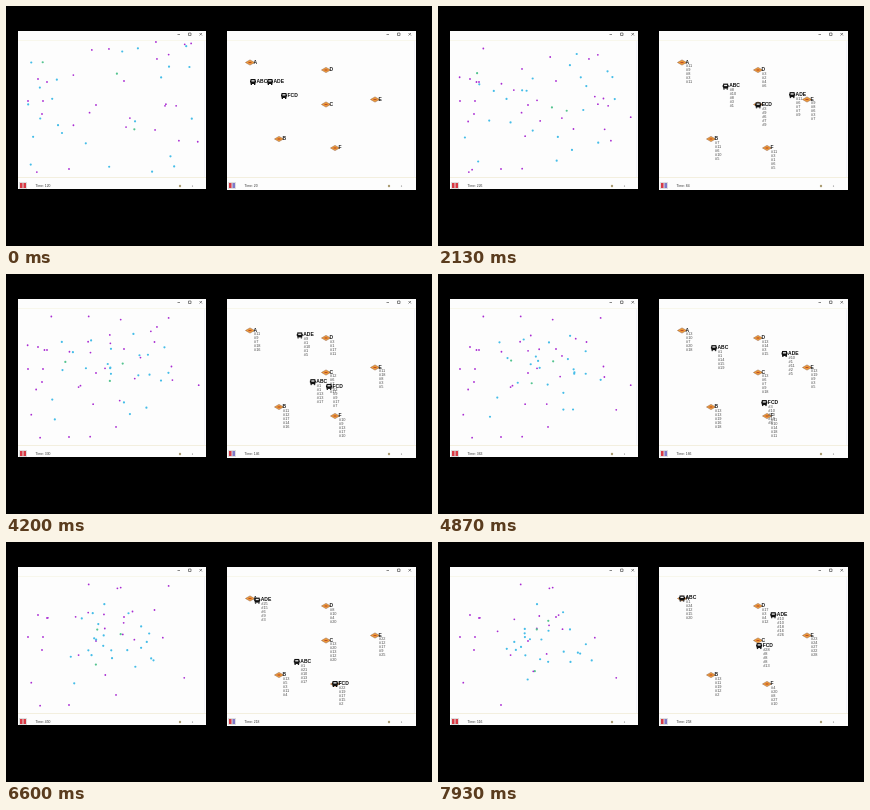
An HTML page with a canvas that plays this animation: 426x240 px, repeating every 8 s.

```html
<!DOCTYPE html>
<html lang="en">
<head>
<meta charset="utf-8">
<title>Bus simulation</title>
<style>
  html, body { margin: 0; width: 100%; height: 100%; overflow: hidden; background: #000; }
  canvas { display: block; width: 426px; height: 240px; }
</style>
</head>
<body>
<canvas id="stage" width="426" height="240"></canvas>
<script>
const ctx = document.getElementById('stage').getContext('2d');
const LOOP = 8, FPS = 15;
const PURPLE = '#a92bd2', CYAN = '#45bde8', GREEN = '#55c490';

const stops = {
  A: [244, 56.5], B: [273, 133], C: [320, 98.5],
  D: [320, 64], E: [369, 93.5], F: [329, 142]
};

// Speed in pixels per second; wait is the pause in seconds at the first stop of the route.
const buses = [
  { name: 'ABC', route: 'ABC', start: [247, 76], speed: 100, wait: .33 },
  { name: 'ADE', route: 'ADE', start: [264, 76], speed: 86, wait: .15 },
  { name: 'FCD', route: 'FCDC', start: [278, 90], speed: 92, wait: .2 }
];

function hash(a, b = 0) {
  const v = Math.sin(a * 127.1 + b * 311.7) * 43758.5453;
  return v - Math.floor(v);
}

const mix = (a, b, k) => a + (b - a) * k;
const distance = (p, q) => Math.hypot(p[0] - q[0], p[1] - q[1]);

function positionOn(path, t) {
  const next = path.findIndex(([time]) => time > t);
  const [t0, p] = path[next - 1], [t1, q] = path[next];
  const k = (t - t0) / (t1 - t0);
  return [mix(p[0], q[0], k), mix(p[1], q[1], k)];
}

function busPath({ route, start, speed, wait }) {
  const path = [[0, start]];
  let time = 0, spot = start;
  for (let visit = 0; time <= LOOP; visit++) {
    const stop = stops[route[visit % route.length]];
    time += distance(spot, stop) / speed;
    path.push([time, stop]);
    if (visit % route.length === 0) {
      time += visit ? wait : wait / 2;
      path.push([time, stop]);
    }
    spot = stop;
  }
  return path;
}
for (const bus of buses) bus.path = busPath(bus);

const seededSpot = (id, salt) => [
  mix(15, 195, hash(id, salt)),
  mix(36, 167, hash(id, salt + .5))
];

function walkPath(id) {
  let time = 0, spot = seededSpot(id, 1);
  const path = [[0, spot]];
  for (let leg = 2; time <= LOOP; leg++) {
    const goal = seededSpot(id, leg);
    time += 1 + 1.5 * hash(id, leg + .2);
    spot = [mix(spot[0], goal[0], .3), mix(spot[1], goal[1], .3)];
    path.push([time, spot]);
  }
  return path;
}

const walkers = Array.from({ length: 34 }, (_, i) => ({
  path: walkPath(i + 1),
  color: i % 11 === 2 ? GREEN : i % 4 === 1 ? PURPLE : CYAN
}));

// A few people rest for the whole loop, the others for a while.
const resting = [[22, 95], [90, 99], [63, 163], [36, 108], [37, 95], [32, 73], [41, 76], [118, 75]]
  .map((spot) => ({ spot, from: 0, to: LOOP }));
for (let id = 100; id < 136; id++) {
  const from = mix(-3, 6, hash(id, 7));
  resting.push({ spot: seededSpot(id, 1), from, to: from + 3 + 3 * hash(id, 8) });
}

function rect(color, x, y, w, h) {
  ctx.fillStyle = color;
  ctx.fillRect(x, y, w, h);
}

function text(string, x, y, size, color = '#222', weight = '') {
  ctx.font = `${weight} ${size}px "Liberation Sans", sans-serif`;
  ctx.fillStyle = color;
  ctx.fillText(string, x, y);
}

function dot(x, y, radius, color) {
  ctx.fillStyle = color;
  ctx.beginPath();
  ctx.arc(x, y, radius, 0, 7);
  ctx.fill();
}

function drawWindow(x, width, height, time, secondBar) {
  rect('#fdfdfd', x, 25, width, height);
  rect('#f8f7ec', x, 34, width, 1);
  rect('#f3efdf', x, 171, width, 1);
  rect('#f2f3fa', x + width - 2, 35, 1, 136);

  ctx.strokeStyle = '#555';
  ctx.lineWidth = .7;
  ctx.beginPath();
  ctx.moveTo(x + 159.5, 28.5); ctx.lineTo(x + 162, 28.5);
  ctx.rect(x + 170.5, 27, 2.5, 2.5);
  ctx.moveTo(x + 181.5, 27); ctx.lineTo(x + 184, 29.5);
  ctx.moveTo(x + 184, 27); ctx.lineTo(x + 181.5, 29.5);
  ctx.stroke();

  rect('#dedede', x + 1, 176, 8, 7);
  rect('#d93a45', x + 2, 177, 2.5, 5);
  rect(secondBar, x + 5.5, 177, 2.5, 5);
  text('Time: ' + time, x + 17.5, 181.3, 3.4, '#333');
  dot(x + 162, 180, 1.2, '#ab9c72');
  dot(x + 174.5, 180, .6, '#777');
}

function drawQueue(x, y, id, rows, t) {
  const batch = Math.floor((t + hash(id) * 1.4) / 1.5);
  for (let row = 0; row < rows; row++) {
    const number = 1 + Math.floor(hash(id * 9 + row, batch) * (5 + 3 * t));
    text('#' + number, x + 4, y + 4.6 + row * 4, 3.9, '#4a4a4a');
  }
}

function drawStop(name, id, t, boarding) {
  const [x, y] = stops[name];
  ctx.beginPath();
  ctx.moveTo(x - 4.5, y); ctx.lineTo(x, y - 2.6);
  ctx.lineTo(x + 4.5, y); ctx.lineTo(x, y + 2.6);
  ctx.closePath();
  ctx.fillStyle = '#f3a03a';
  ctx.fill();
  ctx.strokeStyle = '#8a5232';
  ctx.lineWidth = .5;
  ctx.stroke();
  rect('#b94e2a', x - 1.5, y - .6, 3, 1.2);
  text(name, x + 3.5, y + 1, 5, '#222', 'bold');
  if (t > .3 && !boarding) drawQueue(x, y, id, name === 'D' ? 4 : 5, t);
}

function drawBus(name, [x, y], id, t) {
  rect('#111', x - 2.5, y - 3, 5, 5);
  rect('#111', x - 3, y - 1.5, 6, 2);
  rect('#eee', x - 1.5, y - 1.8, 3, 1.3);
  rect('#111', x - 2.3, y + 2, 1.3, 1);
  rect('#111', x + 1, y + 2, 1.3, 1);
  text(name, x + 3.5, y + .8, 5, '#111', 'bold');
  if (t > 1.25) drawQueue(x, y, id, 5, t);
}

function draw(t) {
  rect('#000', 0, 0, 426, 240);

  drawWindow(12, 188, 158, Math.floor(120 + t * 50), '#d93a45');
  for (const { spot, from, to } of resting) {
    if (t >= from && t <= to) dot(...spot, .9, PURPLE);
  }
  for (const { path, color } of walkers) {
    dot(...positionOn(path, t), color === PURPLE ? .9 : 1.1, color);
  }

  drawWindow(221, 189, 159, Math.floor(20 + t * 30), '#7f79c9');
  const spots = buses.map(({ path }) => positionOn(path, t));
  Object.keys(stops).forEach((name, i) => {
    const boarding = spots.some((spot) => distance(spot, stops[name]) < 8);
    drawStop(name, i + 1, t, boarding);
  });
  buses.forEach(({ name }, i) => drawBus(name, spots[i], i + 20, t));
}

const started = performance.now();
function tick() {
  const seconds = ((performance.now() - started) / 1000) % LOOP;
  draw((Math.floor(seconds * FPS + .1) / FPS) % LOOP);
  requestAnimationFrame(tick);
}
tick();
</script>
</body>
</html>
```
